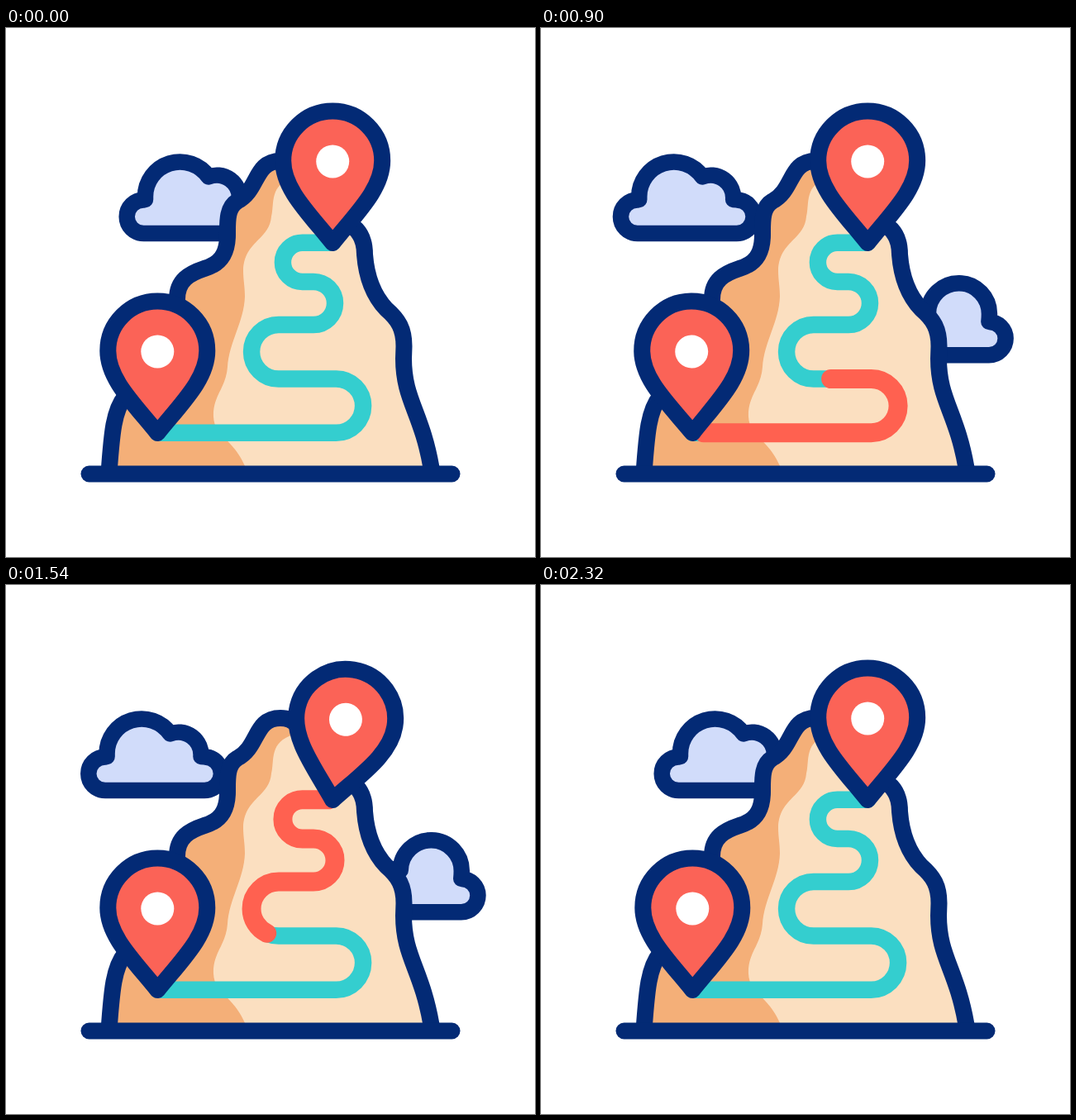
An HTML page for the animation above (2400 ms loop, 640x640 px).

```html
<!DOCTYPE html>
<html lang="en">
<head>
<meta charset="utf-8">
<title>Mountain route</title>
<style>
  html, body { margin: 0; width: 100%; height: 100%; overflow: hidden; background: #fff; }
  svg { display: block; width: 100vw; height: 100vh; }
  .line { stroke: #032a75; stroke-width: 20; stroke-linecap: round; stroke-linejoin: round; }
  .cloud { fill: #d1dcfa; stroke-width: 19.5; }
  .route { fill: none; stroke-width: 20.5; stroke-linecap: round; }
</style>
</head>
<body>
<svg viewBox="0 0 640 640" xmlns="http://www.w3.org/2000/svg">
  <defs>
    <path id="hill" d="M125 532 C128 492 130 463 144 446 C165 425 207 380 207 328
      C207 305 222 297 240 291 C258 286 268 275 268 250 C268 235 267 217 280 209.5
      C306 196 300 161 332 161 C355 161 358 180 365 198 C375 220 394 229 408 234
      C428 241 434 257 434 274 C436 300 443 322 460 340 C475 353 481.5 364 481.5 385
      L481 400 C481 450 503 465 514.5 532"/>
    <path id="way" d="M183.5 489.7 H399.5 A32.6 32.6 0 0 0 399.5 424.5 H329.8
      A32.75 32.75 0 0 1 329.8 359 H372 A26 26 0 0 0 372 307 H358.5
      A23.6 23.6 0 0 1 358.5 259.8 H395"/>
    <clipPath id="inside"><use href="#hill"/></clipPath>
    <g id="pin">
      <path class="line" fill="#fb6357" d="M0 0 C-28.5 -35.5 -60 -65 -60 -99.5
        A60 60 0 0 1 60 -99.5 C60 -65 28.5 -35.5 0 0 Z"/>
      <circle cy="-98.5" r="20" fill="#fff"/>
    </g>
  </defs>

  <path id="cloudL" class="line cloud" d="M106.5 248.5 A20.3 20.3 0 0 1 106.5 207.9 L108.5 207.5 V204
    A42 42 0 0 1 185 180 A27.5 27.5 0 0 1 222.4 207.5 L226.5 207.9 A20.3 20.3 0 0 1 226.5 248.5 Z"/>
  <path id="cloudR" class="line cloud" d="M482 395.8 H572 A20.2 20.2 0 0 0 572 355.4
    Q572.5 351 572.5 346.5 A37 37 0 0 0 498.5 345 Q493 343.5 488 343.5 A26 26 0 0 0 482 395.8 Z"/>

  <use href="#hill" fill="#fbdfc0"/>
  <path clip-path="url(#inside)" fill="#f4af78" d="M348 181 C318 190 325 212 321 228
    C319 256 288 258 287 293 C287 305 289 312 289 325 C288 355 270 380 268 410
    C266 436 250 445 251 470 C252 495 274 495 290 532 H100 V150 H348 Z"/>
  <use href="#way" class="route" stroke="#34cecf"/>
  <path id="trail" class="route" stroke="#ff6150" style="stroke-width:23"/>
  <use href="#hill" class="line" fill="none"/>
  <path class="line" d="M100.5 539.5 H539.5"/>
  <use id="pinA" href="#pin"/>
  <use id="pinB" href="#pin"/>
</svg>
<script>
  const LOOP = 2400;
  const PIN_DELAY = 860;
  const $ = id => document.getElementById(id);

  // Tracks are [time, value] steps joined by sine easing.
  const tracks = {
    cloudL: [[180, 60], [1200, -2], [2220, 60]],
    cloudR: [[370, -122], [1200, 7], [2300, -122]],
    head: [[184, 0], [1624, 1]],
    tail: [[780, 0], [2220, 1]],
    hop: [[150, 0], [400, -26], [470, -26], [660, 0]],
    tilt: [[470, 0], [680, -9.2], [1040, 3.5], [1300, 0]]
  };

  function at(name, t) {
    const steps = tracks[name];
    if (t <= steps[0][0]) return steps[0][1];
    for (let i = 1; i < steps.length; i++) {
      const [t0, a] = steps[i - 1], [t1, b] = steps[i];
      if (t < t1) return a + (b - a) * (1 - Math.cos(Math.PI * (t - t0) / (t1 - t0))) / 2;
    }
    return steps[steps.length - 1][1];
  }

  const trail = $('trail');
  trail.setAttribute('d', $('way').getAttribute('d'));
  const length = trail.getTotalLength();

  const move = (id, value) => $(id).setAttribute('transform', value);

  function placePin(id, x, y, t, side) {
    move(id, `translate(${x} ${y + at('hop', t)}) rotate(${side * at('tilt', t)})`);
  }

  function draw(t) {
    move('cloudL', `translate(${at('cloudL', t)} 0)`);
    move('cloudR', `translate(${at('cloudR', t)} 0)`);

    const head = at('head', t) * length, tail = at('tail', t) * length;
    trail.style.visibility = head - tail > 0.01 ? 'visible' : 'hidden';
    trail.setAttribute('stroke-dasharray', `${head - tail} ${length * 3}`);
    trail.setAttribute('stroke-dashoffset', -tail);

    placePin('pinA', 183.3, 490, t, 1);
    placePin('pinB', 395.2, 260, t - PIN_DELAY, -1);
  }

  const start = performance.now();
  function tick() {
    draw((performance.now() - start) % LOOP);
    requestAnimationFrame(tick);
  }
  draw(0);
  requestAnimationFrame(tick);
</script>
</body>
</html>
```
